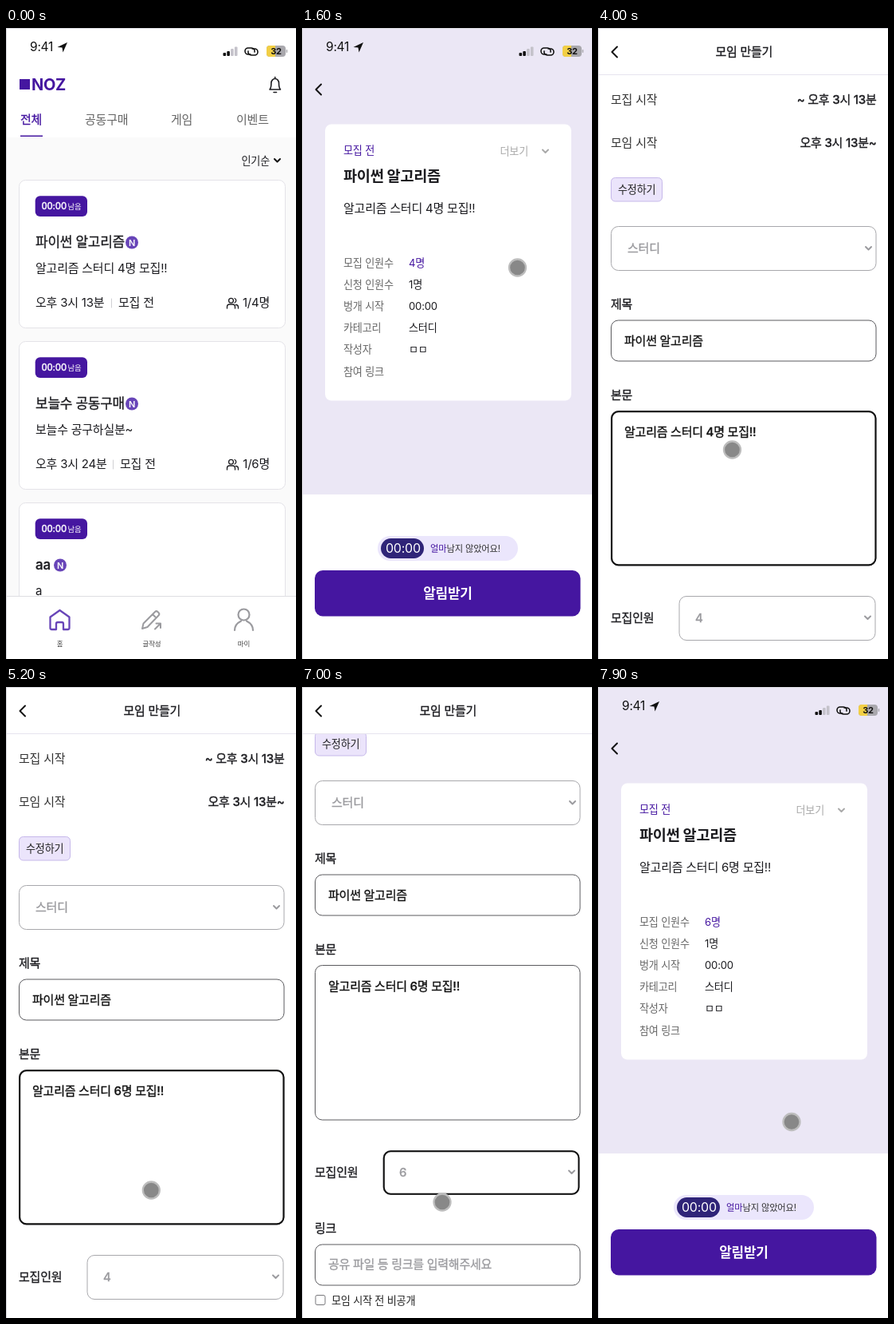
Recreate the animation shown at these times as an HTML page. Size 364 by 790 pixels, loop 8000 ms.

```html
<!DOCTYPE html>
<html lang="ko">
<head>
<meta charset="utf-8">
<style>
html, body { margin: 0; height: 100%; overflow: hidden; background: #fff; }
svg { display: block; width: 364px; height: 790px; font-family: Inter, 'Noto Sans CJK KR', sans-serif; }
text { letter-spacing: -.015em; }
</style>
</head>
<body>
<svg id="stage" viewBox="0 0 364 790"></svg>
<script>
const PURPLE = '#4516a0', VIOLET = '#6845b8', INK = '#1c1c20', GRAY = '#666', PALE = '#9b9b9f';

// Medium weight gets a hairline outline, as the Korean font has only regular and bold.
const text = (x, y, size, str, fill = INK, weight = 400, extra = '') =>
  `<text x="${x}" y="${y}" font-size="${size}" fill="${fill}" font-weight="${weight}" ${
    weight === 500 ? `stroke="${fill}" stroke-width=".3"` : ''} ${extra}>${str}</text>`;
const rect = (x, y, w, h, r, fill, stroke = 'none', extra = '') =>
  `<rect x="${x}" y="${y}" width="${w}" height="${h}" rx="${r}" fill="${fill}" stroke="${stroke}" ${extra}/>`;
const line = (d, stroke = INK, width = 2) =>
  `<path d="${d}" fill="none" stroke="${stroke}" stroke-width="${width}" stroke-linecap="round" stroke-linejoin="round"/>`;
const circle = (x, y, r, stroke, width) =>
  `<circle cx="${x}" cy="${y}" r="${r}" fill="none" stroke="${stroke}" stroke-width="${width}"/>`;
const chevron = (x, y, color) => line(`M${x - 3.5} ${y - 2}l3.5 3.5l3.5 -3.5`, color);
const back = y => line(`M24 ${y - 6.5}l-6.5 6.5l6.5 6.5`, '#111');
const END = 'text-anchor="end"', MID = 'text-anchor="middle"';

const statusBar = () =>
  text(30, 29, 15.5, '9:41', '#111') +
  '<path d="M64.5 24L77 18L71.5 30.5L70.5 24.5Z" fill="#111"/>' +
  [4, 6, 9, 11.5].map((h, i) => rect(272.5 + i * 4.8, 35 - h, 3.6, h, 1, i < 2 ? '#111' : '#c4c2ca')).join('') +
  line('M307 33h-3a4 4 0 0 1 0 -8h4a4 4 0 0 1 4 5', '#111', 1.6) +
  line('M309 26h3a4 4 0 0 1 0 8h-4a4 4 0 0 1 -4 -5', '#111', 1.6) +
  rect(327, 22, 24, 14, 4, '#a9a8ad') +
  '<path d="M338 22h-7a4 4 0 0 0 -4 4v6a4 4 0 0 0 4 4h7z" fill="#f2cf45"/>' +
  rect(351.7, 27, 1.5, 4, .7, '#a9a8ad') +
  text(339, 33, 11, '32', '#111', 700, MID);

const card = (y, title, body, time, count, badgeX, dividerX) => `<g transform="translate(0 ${y})">` +
  rect(16.5, .5, 334, 185, 8, '#fff', '#e4e3e8') +
  rect(36.7, 20.2, 65.3, 25.8, 6, PURPLE) +
  text(44.5, 37, 11.2, '00:00', '#fff', 500) + text(77.5, 37, 9.4, '남음', '#fff') +
  text(37, 84, 17, title, INK, 500) +
  `<circle cx="${badgeX}" cy="78.5" r="8" fill="${VIOLET}"/>` +
  text(badgeX, 82.5, 11, 'N', '#fff', 600, MID) +
  text(37, 116, 15, body) + text(37, 159, 15, time) +
  line(`M${dividerX} 149v11`, '#d0d0d4', 1) + text(dividerX + 8.5, 159, 15, '모집 전') +
  line('M277.5 161v-2a3 3 0 0 1 3 -3h4a3 3 0 0 1 3 3v2M288.5 156.5a3 3 0 0 1 3 3v1.5M287 148.5a3 3 0 0 1 0 5.5', INK, 1.3) +
  circle(282.5, 151.3, 2.9, INK, 1.3) +
  text(331, 159, 15, count, INK, 400, END) + '</g>';

const list = rect(0, 0, 364, 790, 0, '#fff') + statusBar() +
  rect(17, 64, 13, 13, 0, PURPLE) + text(32, 78, 20, 'NOZ', PURPLE, 700) +
  line('M331 77h13.5c-2 -2 -2 -4 -2 -8a4.8 5.5 0 0 0 -9.6 0c0 4 0 6 -1.9 8zM336 80.5h3.5M337.7 63v-1.5', INK, 1.6) +
  text(18, 120, 15, '전체', PURPLE, 500) + text(99, 120, 15, '공동구매', GRAY) +
  text(207, 120, 15, '게임', GRAY) + text(289, 120, 15, '이벤트', GRAY) +
  rect(0, 137, 364, 574, 0, '#fafafa') + rect(18, 134.5, 28, 1.5, 0, PURPLE) +
  text(295.5, 171, 13.1, '인기순') + chevron(340.5, 166, '#111') +
  card(190, '파이썬 알고리즘', '알고리즘 스터디 4명 모집!!', '오후 3시 13분', '1/4명', 158, 132.5) +
  card(392, '보늘수 공동구매', '보늘수 공구하실분~', '오후 3시 24분', '1/6명', 158, 134.5) +
  card(594, 'aa', 'a', '', '', 68, 132.5) +
  rect(0, 711, 364, 79, 0, '#fff') + rect(0, 711, 364, 1, 0, '#dedee2') +
  line('M55.5 737.5L67.5 729L79.5 737.5V751a2 2 0 0 1 -2 2H72V746a2 2 0 0 0 -2 -2h-5a2 2 0 0 0 -2 2v7H57.5a2 2 0 0 1 -2 -2z', VIOLET, 2.3) +
  line('M171 752l1.5 -6.5L187 731a2.500 2.500 0 0 1 3.500 0l1 1a2.500 2.500 0 0 1 0 3.500L177.500 750zM184 734l4.500 4.500M187 752.500l7 -7M188.500 745.500h5.500v5.500', PALE) +
  circle(298.5, 734.5, 7, PALE, 2.2) +
  line('M287 754c0 -6 4 -9.500 8 -11.500M310 754c0 -6 -4 -9.500 -8 -11.500', PALE, 2.2) +
  text(67.5, 774, 8.5, '홈', '#444', 400, MID) + text(183, 774, 8.5, '글작성', '#444', 400, MID) +
  text(298.5, 774, 8.5, '마이', '#444', 400, MID);

const rows = [['모집 인원수', '<tspan class="count"></tspan>명'], ['신청 인원수', '1명'], ['벙개 시작', '00:00'],
  ['카테고리', '스터디'], ['작성자', 'ㅁㅁ'], ['참여 링크', '']];
const detail = rect(0, 0, 364, 790, 0, '#fff') + rect(0, 0, 364, 584, 0, '#ebe7f5') + statusBar() + back(77) +
  rect(29, 120.5, 309, 346, 8, '#fff') +
  text(52, 158, 13.1, '모집 전', PURPLE) + text(248.5, 159, 13.1, '더보기', '#aaa') + chevron(305.5, 154.5, '#aaa') +
  text(52, 192, 18.6, '파이썬 알고리즘', INK, 700) +
  text(52, 231, 15, '알고리즘 스터디 <tspan class="count"></tspan>명 모집!!') +
  rows.map(([label, value], i) => text(52, 299 + i * 27.1, 13.1, label, GRAY) +
    text(134, 299 + i * 27.1, 13.1, value, i ? INK : PURPLE)).join('') +
  rect(95, 636, 176, 31, 15.5, '#ebe6fc') + rect(99, 639, 54, 25, 12.5, '#2f2478') +
  text(105, 656.5, 16, '00:00', '#fff') +
  text(161, 656, 11.3, `<tspan fill="${PURPLE}">얼마</tspan>남지 않았어요!`, '#333') +
  rect(16, 679, 333.5, 57.5, 10, PURPLE) + text(183, 714, 17, '알림받기', '#fff', 700, MID);

const field = (x, y, w, h, stroke) => rect(x, y, w, h, 9, '#fff', stroke);
const ring = (id, x, y, w, h) => rect(x, y, w, h, 8.5, 'none', '#111', `stroke-width="2" id="${id}"`);
const edit = rect(0, 0, 364, 790, 0, '#fff') + '<g id="form">' +
  text(16, 95, 15, '모집 시작', '#333') + text(349.5, 95, 15, '~ 오후 3시 13분', INK, 500, END) +
  text(16, 149, 15, '모임 시작', '#333') + text(349.5, 149, 15, '오후 3시 13분~', INK, 500, END) +
  rect(16.5, 187.5, 64, 29.5, 5, '#ebe4fb', '#c6b8ea') + text(25, 207, 13.1, '수정하기', '#222') +
  field(16.5, 248.5, 332.5, 55, '#a8a8ac') + text(37, 281, 15, '스터디', PALE, 500) + chevron(339.5, 276, PALE) +
  text(16, 351, 15, '제목', INK, 500) + field(16.5, 366, 332.5, 51, '#5a5a5e') +
  text(33, 397, 15, '파이썬 알고리즘', '#111', 500) +
  text(16, 465, 15, '본문', INK, 500) + field(16.5, 479.5, 332.5, 193.5, '#5a5a5e') +
  ring('bodyRing', 17.2, 480.2, 331.2, 192) +
  text(33, 511, 15, '알고리즘 스터디 <tspan id="typed"></tspan>명 모집!!', '#111', 500) +
  text(16, 744, 15, '모집인원', INK, 500) + field(102, 711.5, 246, 55, '#a8a8ac') +
  ring('countRing', 102.8, 712.2, 244.6, 53.6) +
  text(122, 744, 15, '', PALE, 500, 'id="picked"') + chevron(338.5, 738.5, PALE) +
  text(16, 814, 15, '링크', INK, 500) + field(16.5, 829, 332.5, 51, '#5a5a5e') +
  text(33, 859, 15, '공유 파일 등 링크를 입력해주세요', PALE, 500) +
  rect(17, 892.5, 12, 12, 2, '#fff', '#77777b') + text(37, 904, 13.1, '모임 시작 전 비공개', '#222') + '</g>' +
  rect(0, 0, 364, 58, 0, '#fff') + rect(0, 58, 364, 1, 0, '#e6e4ef') +
  back(30) + text(147.5, 35, 15, '모임 만들기', INK, 500);

const stage = document.getElementById('stage');
stage.innerHTML = `<g id="list">${list}</g><g id="detail">${detail}</g><g id="edit">${edit}</g>` +
  rect(0, 0, 364, 1, 0, '#d9d8de') + rect(0, 0, 1, 790, 0, '#d9d8de') +
  '<circle id="pointer" r="10.5" fill="#888" stroke="#bdbdbd" stroke-width="2.3"/>';
const $ = id => document.getElementById(id);
const show = (id, on) => $(id).style.display = on ? '' : 'none';

// time, x, y
const path = [[500, 190, 360], [950, 215, 292], [1250, 215, 292], [1600, 270.5, 300], [1950, 288, 158], [2200, 288, 158],
  [2450, 276.5, 226.5], [2750, 276.5, 226.5], [3400, 166, 522], [4000, 168.5, 528], [4900, 168.5, 528],
  [5500, 196, 731], [5850, 196, 731], [6200, 169.5, 587.5], [6500, 170, 600], [7000, 176, 645],
  [7350, 205, 720], [7600, 205, 720], [7900, 243, 544.5]];
const ease = p => p * p * (3 - 2 * p);
const progress = (t, a, b) => ease(Math.min(1, Math.max(0, (t - a) / (b - a))));

function pointerAt(t) {
  const i = path.findIndex(p => p[0] > t);
  if (i < 0) return path.at(-1).slice(1);
  const a = path[Math.max(0, i - 1)], b = path[i], p = progress(t, a[0], b[0]);
  return [a[1] + (b[1] - a[1]) * p, a[2] + (b[2] - a[2]) * p];
}

function draw(now) {
  const t = now % 8000;
  const screen = t < 1200 ? 'list' : t < 2500 || t >= 7600 ? 'detail' : 'edit';
  for (const id of ['list', 'detail', 'edit']) show(id, id === screen);
  document.querySelectorAll('.count').forEach(el => el.textContent = t < 7600 ? 4 : 6);
  $('typed').textContent = t < 4900 ? '4' : t < 5100 ? '' : '6';
  $('picked').textContent = t < 6100 ? '4' : '6';
  show('bodyRing', t >= 3500 && t < 5700);
  show('countRing', t >= 5800);
  $('form').setAttribute('transform', `translate(0 ${-131 * progress(t, 6650, 7000)})`);
  const [x, y] = pointerAt(t);
  $('pointer').setAttribute('transform', `translate(${x} ${y})`);
  show('pointer', t >= 500);
  requestAnimationFrame(draw);
}
draw(0);
</script>
</body>
</html>
```
